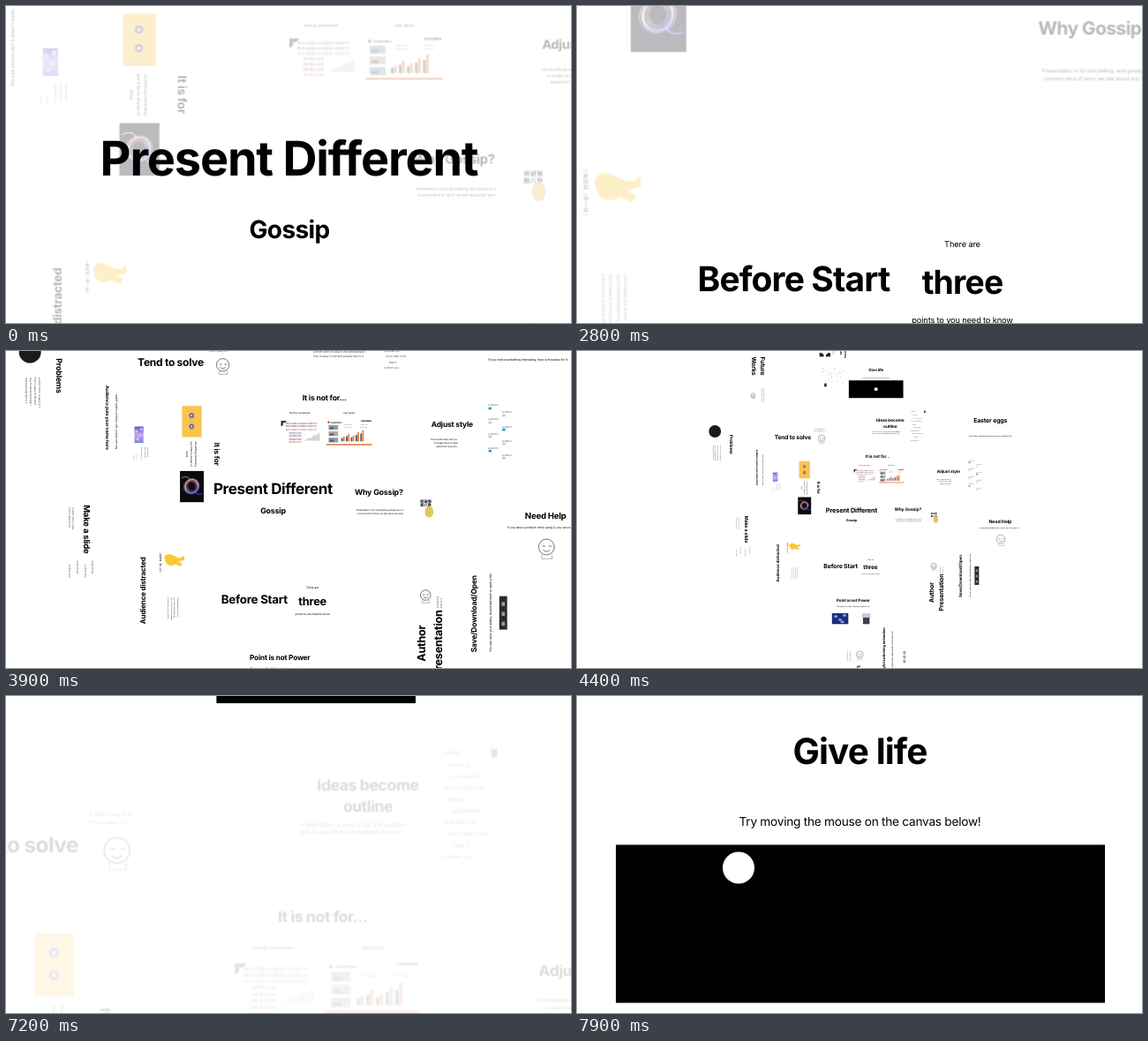
An HTML page for the animation above (8000 ms loop, 640 by 359 pixels).

```html
<!DOCTYPE html>
<html lang="en">
<head>
<meta charset="utf-8">
<title>Present Different</title>
<style>
  html, body { margin: 0; width: 100%; height: 100%; overflow: hidden; background: #fff; }
  svg { display: block; width: 100vw; height: 100vh; }
  text {
    font-family: Inter, "Noto Sans CJK SC", "Noto Sans CJK", sans-serif;
    letter-spacing: -.02em; text-anchor: middle; text-rendering: geometricPrecision; white-space: pre;
  }
  .b { font-weight: 700; letter-spacing: -.022em; }
  .start { text-anchor: start; }
</style>
</head>
<body>
<svg id="stage" viewBox="0 0 640 359">
  <defs>
    <linearGradient id="dusk" x2="0" y2="1">
      <stop offset="0" stop-color="#4b5fd0"/><stop offset=".5" stop-color="#c9a3ee"/><stop offset="1" stop-color="#6f86dd"/>
    </linearGradient>
    <linearGradient id="neon" x1="0" y1="0" x2="1" y2="1">
      <stop offset="0" stop-color="#ff8a5c"/><stop offset=".5" stop-color="#f6d9ff"/><stop offset="1" stop-color="#5a48ff"/>
    </linearGradient>
  </defs>
</svg>
<script>
const LOOP = 8000, CX = 320, CY = 179.5;
const stage = document.getElementById('stage');

function el(parent, tag, attrs) {
  const node = document.createElementNS('http://www.w3.org/2000/svg', tag);
  for (const k in attrs) node.setAttribute(k, attrs[k]);
  return parent.appendChild(node);
}
const group = (parent, transform = '') => el(parent, 'g', { transform });
const rect = (g, x, y, width, height, fill) => el(g, 'rect', { x, y, width, height, fill });
const dot = (g, cx, cy, r, fill) => el(g, 'circle', { cx, cy, r, fill });
const path = (g, d, stroke, width = .4, fill = 'none') =>
  el(g, 'path', { d, stroke, fill, 'stroke-width': width, 'stroke-linejoin': 'round', 'stroke-linecap': 'round' });
// Text centred vertically on (x, y), turned by rot degrees.
function label(g, str, x, y, size, rot = 0, cls = '', fill = '#000') {
  const node = el(g, 'text', { x, y, dy: '.36em', 'font-size': size, class: cls, fill, transform: `rotate(${rot} ${x} ${y})` });
  node.textContent = str;
  return node;
}
const head = (g, str, x, y, size, rot = 0, cls = '') => label(g, str, x, y, size, rot, 'b ' + cls);

const WORDS = 'a short story is easy to tell and people like to hear it when you make it simple and fun to follow from the start';
function notes(g, x, y, rows, chars, size, gap, rot = 0, fill = '#444') {
  const block = group(g, `translate(${x} ${y}) rotate(${rot})`);
  for (let i = 0; i < rows; i++)
    label(block, WORDS.substr(i * 9 % 50, chars - i * 5 % 4), 0, i * gap, size, 0, 'start', fill);
}
function doodle(g, x, y, r) {
  el(g, 'circle', { cx: x, cy: y, r, fill: '#fff', stroke: '#333', 'stroke-width': .3 });
  path(g, `M${x - r * .5} ${y - r * .1}h${r * .3}M${x + r * .3} ${y - r * .1}h${r * .3}M${x - r * .4} ${y + r * .4}q${r * .4} ${r * .4} ${r * .8} 0`, '#333', .3);
  path(g, `M${x - r * .6} ${y + r}v${r * .5}h${r * 1.3}v${-r * .5}`, '#777', .25);
}

// Each plane is drawn as seen from its home view, at depth z.
function plane(x, y, s, z) { return { x, y, s, z, g: group(stage) }; }
const back = plane(320, 179.5, 1, 1.42);
const give = plane(334.9, 63.4, 11.08, 1.42);
const before = plane(313.7, 228.8, 8.93, .98);
const cover = plane(312.4, 182.7, 9.08, 0);
const drift = group(stage);

// Cover
head(cover.g, 'Present Different', 320.5, 172.8, 54);
head(cover.g, 'Gossip', 321, 252.8, 28);

// Before the start
head(before.g, 'Before Start', 219.5, 216.5, 50);
head(before.g, 'three', 465, 222, 48);
label(before.g, 'There are', 465, 166, 12);
label(before.g, 'points to you need to know', 465, 276.8, 12);

// Canvas slide
head(give.g, 'Give life', 320.5, 62.3, 40.5);
label(give.g, 'Try moving the mouse on the canvas below!', 320.5, 142, 13.7);
rect(give.g, 44, 168.5, 554, 179, '#000');
const ball = dot(give.g, 321, 258, 18, '#fff');

// Slides around the cover, in the cover's pixels
const near = group(back.g, 'matrix(.2688 0 0 .2688 228.28 133.65)');
label(near, "Not sure what to say? It doesn't matter, gather", 10, 92, 5, -90, 'start');
head(near, 'Audience puts your name here', -8, 32, 8.5, 90);
rect(near, 44, 49, 17, 31, 'url(#dusk)');
[[48, 58], [54, 66], [50, 73], [57, 54]].forEach(([x, y]) => dot(near, x, y, 2.6, '#e9b8e8'));
notes(near, 58, 88, 3, 18, 3, -6, 90);
notes(near, 42, 103, 2, 9, 2.6, -6, 90);

rect(near, 134, 10, 37, 59, '#f8c54e');
el(near, 'rect', { x: 147, y: 20, width: 10, height: 38, rx: 5, fill: '#f3b957' });
[28, 49].forEach(y => {
  dot(near, 152, y, 4.6, '#5d52a3');
  dot(near, 152, y, 2, '#f8dca0');
});
['Something interesting', "you'd like to display of", 'share'].forEach((s, i) => label(near, s, 160 - i * 8, 101, 4.7, 90));
head(near, 'It is for', 200, 101, 13.6, 90);

rect(near, 130, 133, 45, 59, '#0b0a12');
[[9, 4, .35], [12, 2.4, .9], [14, 1, .6]].forEach(([r, w, o], i) =>
  el(near, 'ellipse', { cx: 152, cy: 162, rx: r, ry: r * 1.1, fill: 'none', stroke: 'url(#neon)', 'stroke-width': w, opacity: o, transform: `rotate(${i * 25} 152 162)` }));
path(near, 'M133 146q12 -6 16 4M158 172q6 8 14 4', 'url(#neon)', 1.2);

head(near, 'Audience distracted', 60, 359, 13.4, -90);
label(near, '（ 听一会！就走神 ）', 94, 306, 4.6, -90);
path(near, 'M101 296q5 -9 16 -3l8 4 8 0 4 -4 1 8 -5 1 -7 2 8 5 -3 4 -10 -4q-17 9 -20 -13z', '#f7c934', 1, '#f7c934');
notes(near, 108, 372, 4, 30, 3.4, -6, 90);

head(near, 'Why Gossip?', 506, 173, 14.8);
label(near, 'Presentation is for storytelling, and gossip is a', 508, 207, 4.3);
label(near, 'common kind of story we talk about any time', 508, 214, 4.3);
head(near, '听说有', 595, 190, 7.4);
head(near, '新八卦', 595, 197.5, 7.4);
el(near, 'ellipse', { cx: 601, cy: 210, rx: 8, ry: 11, fill: '#e5c266' });

head(near, 'It is not for...', 403, -6, 14.4);
label(near, 'Boring courseware', 357, 23, 4.5);
label(near, 'Dull report', 450, 23, 4.5);
path(near, 'M321 38h11l-3 4h-4v4l-4 3z', 'none', 0, '#333');
for (let i = 0; i < 7; i++)
  label(near, i < 3 ? '教学内容要点与课堂练习说明文字' : '· 课件要点说明', 330 + (i > 2 ? 4 : 0), 43 + i * 6, 4, 0, 'start', ['#b33', '#44a', '#c63', '#36a'][i % 4]);
path(near, 'M366 75l8 -4 4 0 5 -5 5 0 6 -5v14z', '#bbb', .4, '#d5d5d5');
dot(near, 411, 41, 2, '#d33');
label(near, 'QUARTERLY', 415, 41, 3.6, 0, 'b start');
label(near, '年度总结报告', 482, 39, 3.4, 0, 'b');
[46, 58, 70].forEach((y, i) => {
  rect(near, 411, y, 18, 9, ['#8aa0b4', '#b6a9a2', '#8f9db2'][i]);
  rect(near, 413, y + 4, 8, 4, '#5c6470');
});
[9, 14, 11, 17, 21].forEach((h, i) => {
  rect(near, 435 + i * 9, 77 - h * .7, 3, h * .7, '#495468');
  rect(near, 438.4 + i * 9, 77 - h, 3.2, h, '#e8834a');
});
notes(near, 440, 46, 2, 14, 2.6, 4);
notes(near, 471, 46, 2, 12, 2.6, 4);
rect(near, 407, 82, 86, 2.4, '#e0703c');

head(near, 'Adjust style', 605, 45, 14.2, 0, 'start');
['One modification and you', 'no longer have to make', 'adjustment anymore'].forEach((s, i) =>
  label(near, s, [604, 610, 614][i], 72.5 + i * 7.2, 4.3, 0, 'start'));

// The rest of the map
const far = back.g;
head(far, 'Future', 231, 49, 5.6, 90);
head(far, 'Works', 222.5, 49, 5.6, 90);
doodle(far, 222, 76, 2);
notes(far, 232, 69, 2, 24, 1.3, 2, 90);

head(far, 'Resources', 307, 35, 2.7, 90);
head(far, 'made', 303, 35, 2.7, 90);
notes(far, 297, 29, 2, 18, 1.3, 2, 90);
[[285, 32], [291, 32], [285, 39], [291, 39]].forEach(([x, y]) => rect(far, x - 2, y - 2, 4, 3.4, '#222'));
dot(far, 288, 36, 2.6, '#fff');
for (let i = 0; i < 26; i++) dot(far, 286 + (i * 7.9) % 21, 51 + (i * i * 4.7) % 15, .3, '#666');
rect(far, 287.5, 65, 2, 3, '#222');

head(far, 'Ideas become', 348, 99, 3.9);
head(far, 'outline', 348, 104.5, 3.9);
notes(far, 331, 109, 2, 42, 1.5, 1.9);
for (let i = 0; i < 10; i++) label(far, WORDS.substr(i * 6, 8 + i % 4 * 3), 367 + i % 3, 91 + i * 2.9, 1.4, 0, 'start', '#555');
rect(far, 379, 90, 1.5, 2, '#444');

head(far, 'Easter eggs', 440, 99, 5.6);
label(far, 'If you notice something interesting, here is the place for it', 440, 113, 1.55);

head(far, 'Tend to solve', 258.5, 114, 5.4);
notes(far, 278, 106.5, 2, 18, 1.4, 1.9);
doodle(far, 285, 115.5, 3.2);

dot(far, 187, 109, 5.6, '#1b1b1b');
head(far, 'Problems', 202, 121, 4, 90);
notes(far, 192, 122, 4, 26, 1.4, 2.2, 90);

head(far, 'Make a slide', 216, 199, 4.3, 90);
notes(far, 209, 188, 2, 20, 1.3, 2, 90);
for (let i = 0; i < 4; i++) notes(far, 219 - i * 4, 215 + i % 2 * 2, 1, 12, 1.3, 2, 90);

for (let i = 0; i < 8; i++) {
  const x = 420 + i % 2 * 7, y = 136 + i * 3.6;
  notes(far, x, y, 1, 9, 1.3, 2);
  rect(far, x, y + 1, 1.6, 1.2, i % 3 ? '#bcd' : '#39c');
}

head(far, 'Need Help', 449, 192, 4.3);
label(far, 'If you have a problem while using it, you can reach us', 448, 198, 1.5);
doodle(far, 449.5, 208, 4);

head(far, 'Author', 386, 257, 5.7, -90);
head(far, 'Presentation', 394.5, 257, 5.7, -90);
doodle(far, 388, 232.5, 2.6);
notes(far, 394, 239, 2, 10, 1.4, 2, -90);

head(far, 'Save/Download/Open', 412.5, 242, 3.8, -90);
label(far, 'You can save your slides, download them or open a file', 421, 241.5, 1.6, -90);
rect(far, 425.5, 233, 4, 17, '#2a2a2a');
[236, 241, 246].forEach(y => rect(far, 426.7, y, 1.6, 2, '#999'));

head(far, 'Point is not Power', 314, 264, 3.7);
label(far, 'The point of a talk is what you want to say', 314, 270, 1.6);
rect(far, 294.5, 276, 15, 10, '#1d2c78');
[[298, 279], [302, 282], [306, 278], [304, 284]].forEach(([x, y]) => rect(far, x - 1.5, y - 1, 3, 2, '#7ea0ea'));
rect(far, 322, 276, 8, 4, '#c9cdd2');
rect(far, 323, 280, 6, 6, '#38404c');

head(far, 'Delivery', 309.5, 341, 5.7, -90);
head(far, 'Presentation', 318.5, 341, 5.7, -90);
doodle(far, 320, 314, 3.2);
notes(far, 309, 320, 2, 18, 1.3, 2, -90);

head(far, 'Meaningful switching animation', 342, 314, 3.3, -90);
label(far, 'You can set how each slide moves to the next one', 350, 314, 1.9, -90);
for (let i = 0; i < 3; i++) {
  notes(far, 359 + i * 1.8, 336, 1, 14, 1.3, 2, -90);
  doodle(far, 361, 312 + i * 4, 1.1);
}

// Distant slides that pass the left edge
head(drift, 'Delivery', 17, 19, 4);
head(drift, 'Presentation', 17, 25, 4);
doodle(drift, 35, 26, 1.4);
head(drift, 'Need Help', 19, 60.5, 3, 180);
notes(drift, 27, 54, 1, 24, 1.8, 2, 180);
head(drift, 'Easter eggs', 38, 105, 3.8, 90);
label(drift, WORDS.slice(0, 30), 28, 105, 1.7, 90);
head(drift, 'Works', 5, 152.5, 4, 180);
head(drift, 'Future', 5, 158, 4, 180);

// Motion
function bezier(x1, y1, x2, y2) {
  const at = (a, b, u) => 3 * a * u * (1 - u) ** 2 + 3 * b * u * u * (1 - u) + u ** 3;
  return x => {
    if (x <= 0) return 0;
    if (x >= 1) return 1;
    let lo = 0, hi = 1;
    for (let i = 0; i < 24; i++) {
      const mid = (lo + hi) / 2;
      if (at(x1, x2, mid) < x) lo = mid; else hi = mid;
    }
    return at(y1, y2, lo);
  };
}
const easeInOut = bezier(.42, 0, .58, 1), easeOut = bezier(.3, 0, 0, 1);

// bx, by shift the back plane.
const first = { x: 312.4, y: 182.7, s: 9.08, z: 0, bx: 1.9, by: -.8 };
const moves = [
  { at: 2200, dur: 1000, ease: easeInOut, to: { x: 313.55, y: 229.95, s: 9.115, z: 1, bx: -1.1, by: -6.4 } },
  { at: 3300, dur: 1500, ease: easeOut, to: { x: 320, y: 179.5, s: 1, z: 0, bx: 0, by: 0 } },
  { at: 6700, dur: 955, ease: easeInOut, to: { x: 334.9, y: 63.4, s: 11.08, z: 1.42, bx: 0, by: 0 } }
];

function cameraAt(t) {
  const cam = { ...first };
  for (const m of moves) {
    const p = m.ease((t - m.at) / m.dur);
    for (const k in cam) cam[k] += (m.to[k] - cam[k]) * p;
  }
  return cam;
}

function place(p, cam) {
  const spread = Math.min(1, Math.max(0, (cam.s - 1.24) / 7.84));
  const depth = 1 + (p.z - cam.z) * spread;
  p.g.style.display = depth < .1 ? 'none' : '';
  if (depth < .1) return;
  const m = cam.s / depth, isBack = p === back;
  const x = CX + m * (p.x - cam.x - (isBack ? cam.bx : 0));
  const y = CY + m * (p.y - cam.y - (isBack ? cam.by : 0));
  p.g.setAttribute('transform', `translate(${x} ${y}) scale(${m / p.s}) translate(${-CX} ${-CY})`);
}

function draw(t) {
  const cam = cameraAt(t);
  const active = t < 2200 ? cover : t < 3300 ? before : t < 6710 ? null : give;
  for (const p of [back, give, before, cover]) {
    place(p, cam);
    p.g.setAttribute('opacity', !active || p === active ? 1 : .28);
  }
  // The map recedes while the canvas slide comes close.
  if (active === give) back.g.setAttribute('opacity', .28 * (1 - easeInOut((t - 7000) / 400)));
  const k = easeInOut((t - 6250) / 350);
  ball.setAttribute('cx', 321 - 138 * k);
  ball.setAttribute('cy', 258 - 63.5 * k);
  drift.setAttribute('opacity', t > 7300 && t < 7850 ? .35 : 0);
  drift.setAttribute('transform', `translate(${(7500 - t) * .15} ${(7500 - t) * -.08})`);
}

const begin = performance.now();
function tick(now) {
  draw(Math.max(0, now - begin) % LOOP);
  requestAnimationFrame(tick);
}
draw(0);
requestAnimationFrame(tick);
</script>
</body>
</html>
```
